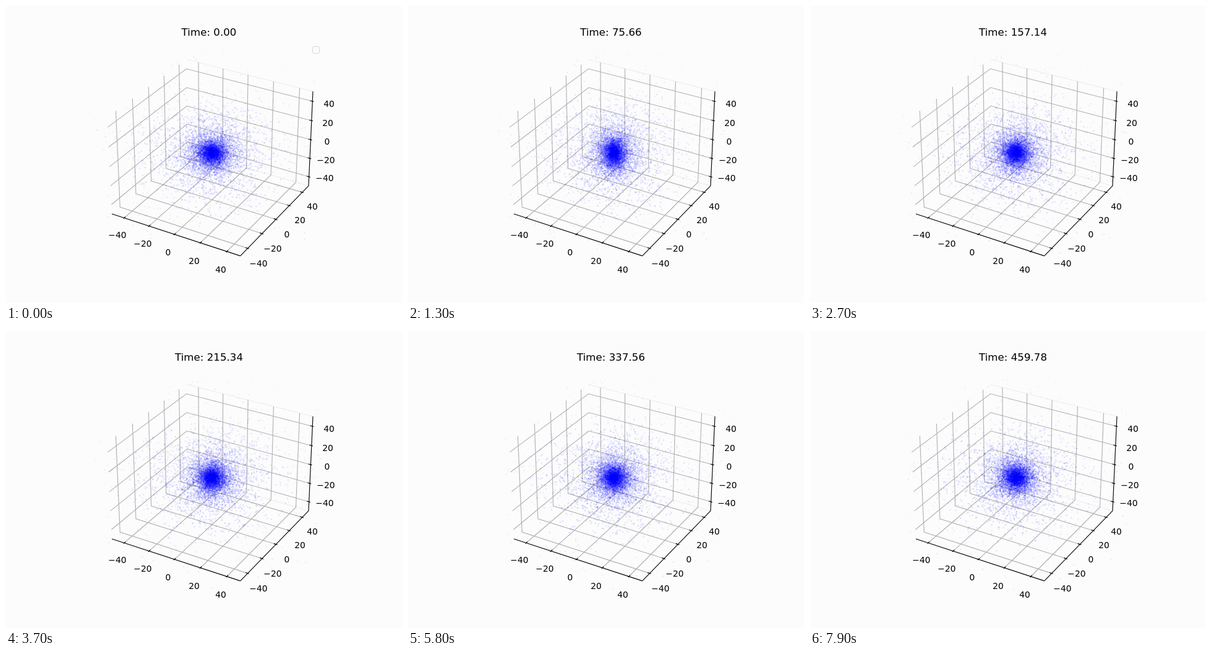
Recreate the animation shown at these times as an HTML page with a canvas. Size 640 by 480 pixels, loop 8000 ms.

```html
<!DOCTYPE html>
<html>
<head>
<meta charset="utf-8">
<style>
html, body { margin: 0; width: 640px; height: 480px; overflow: hidden; background: #fcfcfc; }
canvas { display: block; }
</style>
</head>
<body>
<canvas id="stage" width="640" height="480"></canvas>
<script>
const ctx = document.getElementById('stage').getContext('2d');
const STEP = 100, FRAMES = 80, COUNT = 8500, L = 50;
const TICKS = [-40, -20, 0, 20, 40];
const PLOT = [143.2, 57.6, 369.6, 369.6];

let seed = 12345;
function rand() {
  seed = (seed + 0x6D2B79F5) | 0;
  let n = Math.imul(seed ^ (seed >>> 15), 1 | seed);
  n = (n + Math.imul(n ^ (n >>> 7), 61 | n)) ^ n;
  return ((n ^ (n >>> 14)) >>> 0) / 4294967296;
}

function direction() {
  const z = rand() * 2 - 1, a = rand() * 2 * Math.PI, h = Math.sqrt(1 - z * z);
  return [h * Math.cos(a), h * Math.sin(a), z];
}

// Perspective view: azimuth -60, elevation 30 degrees
function project(x, y, z) {
  const sx = x * 0.011905, sy = y * 0.011905, sz = z * 0.008929;
  const depth = 10 - (0.433 * sx - 0.75 * sy + 0.5 * sz);
  const k = 1997.8 / depth;
  return [
    333 + k * (0.866 * sx + 0.5 * sy),
    237.4 - k * (-0.25 * sx + 0.433 * sy + 0.866 * sz),
    depth
  ];
}

function line(color, width, ...points) {
  ctx.beginPath();
  for (const p of points) ctx.lineTo(...project(...p).slice(0, 2));
  ctx.strokeStyle = color;
  ctx.lineWidth = width;
  ctx.stroke();
}

function drawGrid() {
  line('#ececec', 1, [-L, L, L], [L, L, L], [L, L, -L], [-L, L, -L]);
  for (const v of TICKS) {
    line('#b0b0b0', 1.11, [v, -L, -L], [v, L, -L], [v, L, L]);
    line('#b0b0b0', 1.11, [L, v, -L], [-L, v, -L], [-L, v, L]);
    line('#b0b0b0', 1.11, [-L, -L, v], [-L, L, v], [L, L, v]);
  }
}

function drawAxes() {
  line('#000', 1.11, [-L, -L, -L], [L, -L, -L]);
  line('#000', 1.11, [L, -L, -L], [L, L, -L]);
  line('#000', 1.11, [L, L, -L], [L, L, L]);
  const near = L - 1.7, far = L + 1;
  for (const v of TICKS) {
    line('#000', 1.11, [v, -far, -L], [v, -near, -L]);
    line('#000', 1.11, [far, v, -L], [near, v, -L]);
    line('#000', 1.11, [far, L, v], [near, L, v]);
  }
}

const LABELS = [
  [[180, 370], [221, 384], [262, 398], [304, 412], [347, 426]],
  [[408, 416], [431, 392], [454, 369], [475, 346], [495, 324]],
  [[515, 278], [517, 249], [519, 219], [520, 189], [522, 158]]
];

function drawText(time) {
  ctx.fillStyle = '#000';
  ctx.textAlign = 'center';
  ctx.font = '13.89px "DejaVu Sans", sans-serif';
  for (const axis of LABELS)
    axis.forEach(([x, y], i) => ctx.fillText(String(TICKS[i]).replace('-', '\u2212'), x, y + 5));
  ctx.font = '16.67px "DejaVu Sans", sans-serif';
  ctx.fillText('Time: ' + time.toFixed(2), 328, 48);
}

// A soft dense core inside a sparse, wide halo
function radius() {
  if (rand() < 0.7) return 9 / Math.sqrt(Math.pow(rand(), -2 / 3) - 1);
  const q = Math.sqrt(rand() * 0.735);
  return 15 * q / (1 - q);
}

const stars = Array.from({ length: COUNT }, () => {
  const r = Math.min(radius(), 95), a = direction(), d = direction();
  const dot = a[0] * d[0] + a[1] * d[1] + a[2] * d[2];
  const side = d.map((c, i) => c - dot * a[i]);
  const b = r * (0.4 + 0.6 * rand()) / Math.hypot(...side);
  return {
    r,
    major: a.map(c => c * r),
    minor: side.map(c => c * b),
    phase: rand() * 2 * Math.PI,
    speed: 0.3 / Math.pow(r + 3, 1.5)
  };
});

// Vertical stretch of the core as it collapses and settles
function stretch(t) {
  return 0.3 - 0.22 * Math.exp(-t / 30) + 0.4 * Math.exp(-(((t - 75) / 40) ** 2));
}

function drawStars(t) {
  const g = stretch(t);
  ctx.save();
  ctx.beginPath();
  ctx.rect(...PLOT);
  ctx.clip();
  ctx.fillStyle = '#00f';
  for (const s of stars) {
    const angle = s.phase + s.speed * t, c = Math.cos(angle), n = Math.sin(angle);
    const [x, y, z] = s.major.map((m, i) => m * c + s.minor[i] * n);
    const k = g * Math.exp(-s.r / 25), flat = 1 - k / 2.5;
    const [px, py, depth] = project(x * flat, y * flat, z * (1 + k));
    const shade = Math.max(0.3, Math.min(1, 0.75 - 0.5 * (depth - 10)));
    const outside = Math.hypot(x, y, z) > 58 ? 0.5 : 1;
    ctx.globalAlpha = 0.15 * shade * outside;
    ctx.fillRect(px - 1.05, py - 1.05, 2.1, 2.1);
  }
  ctx.restore();
}

function drawLegend() {
  ctx.beginPath();
  ctx.roundRect(495.5, 65.5, 11, 11, 2.5);
  ctx.strokeStyle = '#d8d8d8';
  ctx.lineWidth = 1;
  ctx.stroke();
}

function draw(frame) {
  const time = frame * 5.82;
  ctx.fillStyle = '#fcfcfc';
  ctx.fillRect(0, 0, 640, 480);
  drawGrid();
  drawAxes();
  drawStars(time);
  drawText(time);
  if (frame === 0) drawLegend();
}

let shown = -1;
const start = performance.now();
function tick() {
  const frame = Math.floor((performance.now() - start) / STEP) % FRAMES;
  if (frame !== shown) draw(shown = frame);
  requestAnimationFrame(tick);
}
draw(shown = 0);
requestAnimationFrame(tick);
</script>
</body>
</html>
```
